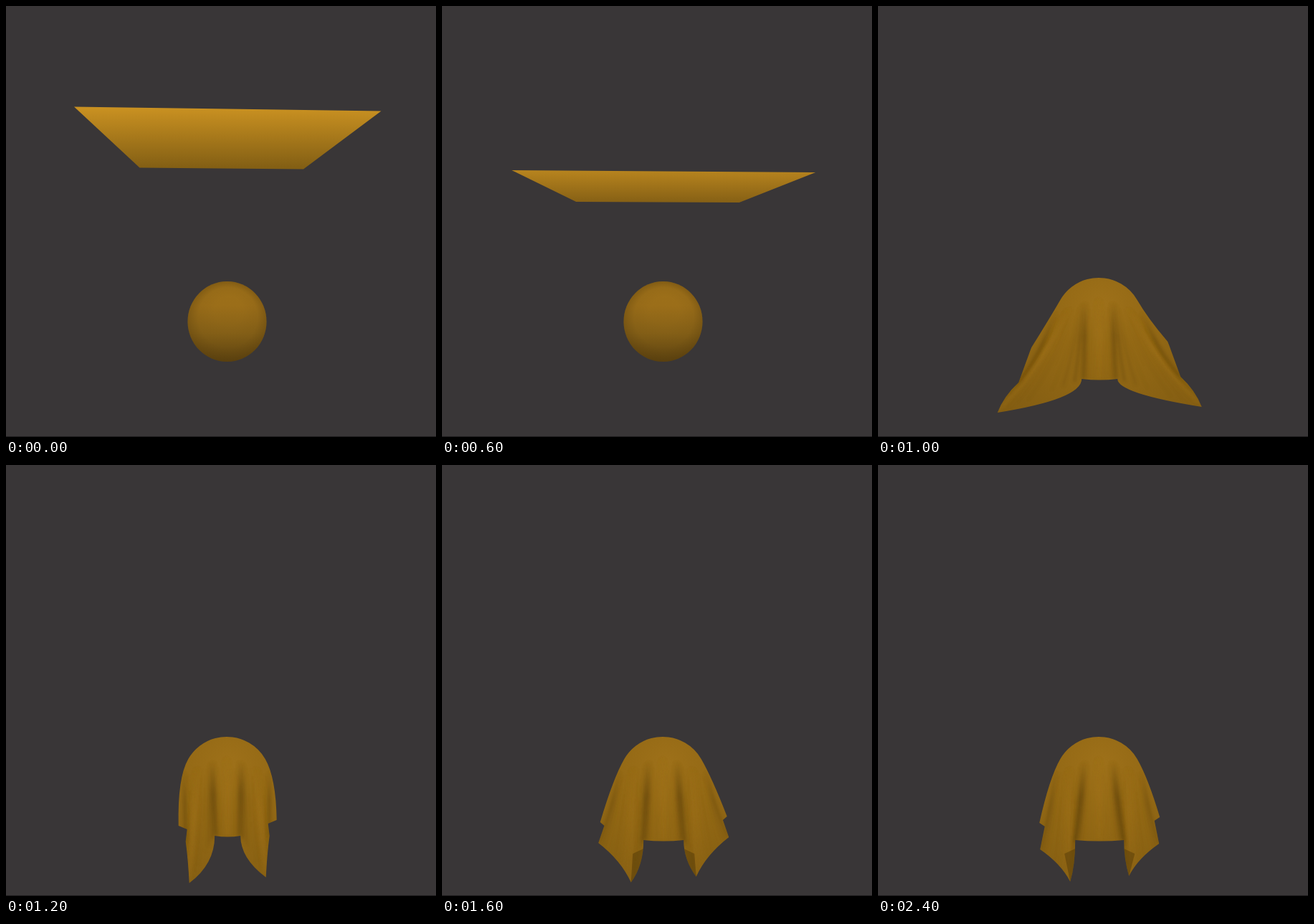
An HTML page with a canvas for the animation above (2500 ms loop, 600 by 601 pixels).

```html
<!DOCTYPE html>
<html lang="en">
<head>
<meta charset="utf-8">
<title>Cloth falling on a ball</title>
<style>
  html, body { margin: 0; width: 100%; height: 100%; overflow: hidden; background: #393637; }
  canvas { display: block; }
</style>
</head>
<body>
<canvas id="stage" width="600" height="601"></canvas>
<script>
const ctx = document.getElementById('stage').getContext('2d');
const LOOP = 2500, STEP = 100;
const LANDED = 900, COVERED = 1000, GATHERED = 1200;

const lerp = (a, b, u) => a + (b - a) * u;
const mix = (a, b, u) => a.map((v, i) => lerp(v, b[i], u));
const clamp = u => Math.min(1, Math.max(0, u));
const rgb = c => `rgb(${c.map(Math.round).join(',')})`;
const linear = u => u;
const smooth = u => u * u * (3 - 2 * u);
const easeOut = u => 1 - (1 - u) ** 1.6;

function gradient(g, ...stops) {
  stops.forEach(([at, color]) => g.addColorStop(at, color));
  return g;
}

function polygon(points, fill) {
  ctx.beginPath();
  points.forEach(p => ctx.lineTo(...p));
  ctx.closePath();
  ctx.fillStyle = fill;
  ctx.fill();
}

// The draped cloth is nearly symmetric: each point is [distance from AXIS, y].
// The right side hangs LIFT pixels higher.
const AXIS = 309.2, LIFT = 8;
const DOME = { x: 308, y: 441, r: 62, angle: Math.PI / 6 };
const POSES = [
  { at: LANDED, ease: linear, sag: 0, back: [110, 440], wide: [150, 472], tip: [191, 505], hem: [30, 470] },
  { at: COVERED, ease: linear, sag: 18, back: [95, 476], wide: [113, 525], tip: [142.5, 567], hem: [25, 520] },
  { at: GATHERED, ease: smooth, sag: 6, back: [68.5, 503], wide: [58.5, 525], tip: [53.5, 583], hem: [18, 517] },
  { at: 1600, ease: easeOut, sag: 0, back: [88.5, 498], wide: [91, 527], tip: [45.5, 582], hem: [28, 523] },
  { at: 2400, ease: linear, sag: 0, back: [84, 499], wide: [83, 536], tip: [41, 581], hem: [34, 523] }
];

function poseAt(t) {
  const i = POSES.findLastIndex(p => t >= p.at);
  const from = POSES[i], to = POSES[i + 1] || from;
  const u = to === from ? 0 : (t - from.at) / (to.at - from.at);
  const pose = {};
  for (const key of ['back', 'wide', 'tip', 'hem']) pose[key] = mix(from[key], to[key], from.ease(u));
  pose.tip[1] += from.sag * Math.sin(Math.PI * u) * (1 - u) * 1.5;
  return pose;
}

// Screen points for one side; dir is -1 for left and 1 for right.
function sideOf({ back, wide, tip, hem }, dir) {
  const lift = dir > 0 ? LIFT : 0;
  const place = ([x, y], up = lift) => [AXIS + dir * x, y - up];
  const { x, y, r, angle } = DOME, c = Math.cos(angle), s = Math.sin(angle);
  return {
    dome: [x + dir * r * c, y - r * s],
    shoulder: [x + dir * (r * c + 30 * s), y - r * s + 30 * c],
    back: place(back),
    notch: place([(back[0] + wide[0]) / 2 - 7, back[1] + 5]),
    wide: place(wide),
    flare: place([lerp(wide[0], tip[0], .7), lerp(wide[1], tip[1], .45)]),
    tip: place(tip),
    inner: place([hem[0], lerp(hem[1], tip[1], .6)]),
    hem: place(hem, 0)
  };
}

function traceCloth(L, R) {
  const curve = (control, end) => ctx.quadraticCurveTo(...control, ...end);
  ctx.beginPath();
  ctx.moveTo(...L.hem);
  curve(L.inner, L.tip);
  curve(L.flare, L.wide);
  ctx.lineTo(...L.notch);
  ctx.lineTo(...L.back);
  curve(L.shoulder, L.dome);
  ctx.arc(DOME.x, DOME.y, DOME.r, Math.PI + DOME.angle, -DOME.angle);
  curve(R.shoulder, R.back);
  ctx.lineTo(...R.notch);
  ctx.lineTo(...R.wide);
  curve(R.flare, R.tip);
  curve(R.inner, R.hem);
  curve([AXIS, L.hem[1] + 3], L.hem);
}

// Folds fan out from the dome: v runs from the axis (0) to the side (1).
function drawFolds(sides, depth) {
  const COUNT = 24, HEM = .35, TIP = .65;
  ctx.filter = 'blur(2px)';
  for (let i = -COUNT; i <= COUNT; i++) {
    const v = i / COUNT, a = Math.abs(v);
    const { hem, tip, wide } = sides[v < 0 ? 0 : 1];
    const end = a < HEM ? mix([AXIS, hem[1]], hem, a / HEM)
      : a < TIP ? mix(hem, tip, (a - HEM) / (TIP - HEM))
      : mix(tip, wide, (a - TIP) / (1 - TIP));
    const start = [DOME.x + v * 60, 405 + 20 * a];
    const shade = (Math.cos(2 * Math.PI * v / .7) + .45 * Math.cos(2 * Math.PI * v / .23)) * depth;
    const color = shade < 0 ? '40,26,0' : '178,127,34';
    const alpha = Math.abs(shade) * (shade < 0 ? .17 : .13);
    ctx.strokeStyle = gradient(ctx.createLinearGradient(0, start[1], 0, end[1]),
      [0, `rgba(${color},0)`], [.45, `rgba(${color},${alpha})`], [1, `rgba(${color},${alpha * .7})`]);
    ctx.lineWidth = 4;
    ctx.beginPath();
    ctx.moveTo(...start);
    ctx.quadraticCurveTo(lerp(start[0], end[0], .4), lerp(start[1], end[1], .6), ...end);
    ctx.stroke();
  }
  ctx.filter = 'none';
}

function drawCloth(t) {
  const pose = poseAt(t), sides = [sideOf(pose, -1), sideOf(pose, 1)];
  ctx.save();
  traceCloth(...sides);
  ctx.fillStyle = gradient(ctx.createRadialGradient(312, 415, 5, 312, 435, 180),
    [0, '#9d7019'], [.35, '#946915'], [1, '#835d12']);
  ctx.fill();
  ctx.clip();
  drawFolds(sides, t < COVERED ? .3 : 1);

  // The undersides of the front corners show as they swing outward.
  const turned = clamp((t - GATHERED) / 400);
  sides.forEach(({ hem, inner, tip }, i) => {
    const fold = [hem[0] + (i ? 15 : -15), hem[1] + 19];
    polygon([fold, [hem[0], hem[1] + 12], inner, tip], `rgba(62,42,4,${.36 * turned})`);
  });
  ctx.restore();
}

function drawBall() {
  ctx.beginPath();
  ctx.ellipse(308.5, 440, 55, 56, 0, 0, Math.PI * 2);
  ctx.fillStyle = gradient(ctx.createLinearGradient(0, 384, 0, 496),
    [0, '#9c6f19'], [.3, '#9b6e19'], [.65, '#856017'], [1, '#614611']);
  ctx.fill();
  ctx.fillStyle = gradient(ctx.createRadialGradient(311, 425, 20, 308.5, 440, 56),
    [0, 'rgba(70,48,8,0)'], [.6, 'rgba(70,48,8,.06)'], [1, 'rgba(70,48,8,.3)']);
  ctx.fill();
}

// The flat sheet falls with constant acceleration; s is 0 at rest and 1 on touching the ball.
function drawSheet(t) {
  const s = t < 400 ? 0 : ((t - 332) / 468) ** 2;
  const nearL = mix([95, 140.5], [102, 410.5], s), nearR = mix([523.5, 146.5], [516.5, 407.5], s);
  const farL = mix([186.5, 225.5], [188.5, 370], s), farR = mix([415, 227.5], [414.5, 369], s);
  const near = rgb(mix([200, 144, 33], [146, 105, 23], s));
  const far = rgb(mix([131, 95, 20], [142, 102, 23], s));
  polygon([nearL, nearR, farR, farL], gradient(
    ctx.createLinearGradient(0, (nearL[1] + nearR[1]) / 2, 0, farL[1]), [0, near], [1, far]));
  if (s >= 1) {
    ctx.beginPath();
    ctx.ellipse(310, 382.5, 18, 3.5, 0, 0, Math.PI * 2);
    ctx.fillStyle = '#996e1a';
    ctx.fill();
  }
}

function draw(t) {
  ctx.fillStyle = '#393637';
  ctx.fillRect(0, 0, 600, 601);
  ctx.fillStyle = '#1d1c1c';
  ctx.fillRect(0, 600, 600, 1);
  if (t < COVERED) drawBall();
  if (t < LANDED) drawSheet(t);
  else drawCloth(t);
}

const start = performance.now();
let shown = -1;
function tick() {
  const t = Math.floor((performance.now() - start) % LOOP / STEP) * STEP;
  if (t !== shown) draw(shown = t);
  requestAnimationFrame(tick);
}
tick();
</script>
</body>
</html>
```
